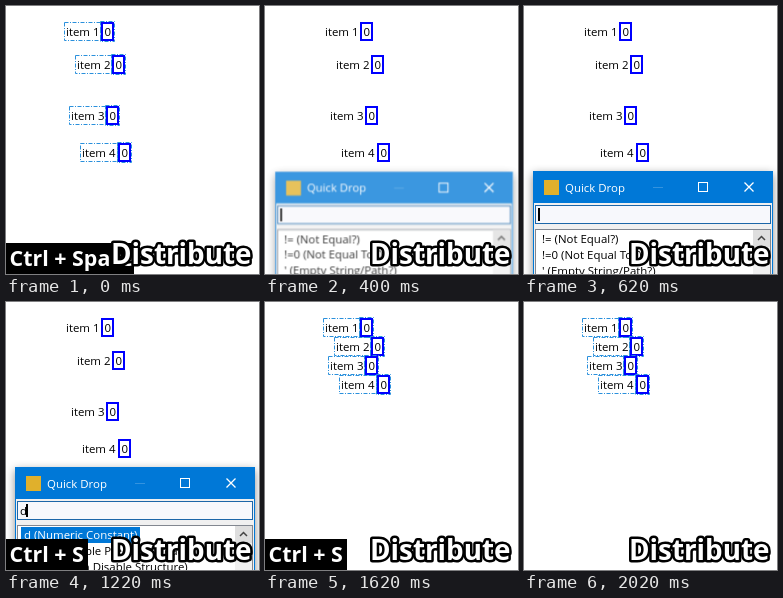
An HTML page that plays this animation: 253x268 px, repeating every 2220 ms.

```html
<!DOCTYPE html>
<html lang="en">
<head>
<meta charset="utf-8">
<title>Distribute</title>
<style>
  html, body { margin: 0; width: 100%; height: 100%; overflow: hidden; background: #fff; }
  svg { display: block; width: 253px; height: 268px; font: 11.45px "Open Sans", "Noto Sans", sans-serif; }
  text { white-space: pre; }

  .row, .ants, .window, .empty, .typed, .space, .save {
    animation: 2220ms step-end infinite;
  }
  .row { animation-name: compress; }
  .num { fill: #fff; stroke: #00f; stroke-width: 2; }
  .ants {
    fill: none; stroke: #2a90dc; stroke-dasharray: 4 1.5 1 1.5;
    animation-name: march;
  }
  .window {
    transform-origin: 129px 240px;
    filter: drop-shadow(0 3px 5px rgba(0, 0, 0, .45));
    animation-name: open;
  }
  .empty { animation-name: empty; }
  .typed { animation-name: typed; }
  .space { animation-name: space; }
  .save { animation-name: save; }
  .keys text { font-size: 21.4px; font-weight: 700; fill: #fff; }
  .caption {
    font-size: 27.8px; font-weight: 700; fill: #fff;
    stroke: #000; stroke-width: 5; stroke-linejoin: round; paint-order: stroke;
  }

  @keyframes compress {
    0% { transform: translateY(0); }
    72.973%, 100% { transform: translateY(var(--shift)); }
  }
  @keyframes march {
    0% { visibility: visible; stroke-dashoffset: 0; }
    9.009% { visibility: visible; stroke-dashoffset: -4; }
    18.018% { visibility: hidden; }
    72.973% { visibility: visible; stroke-dashoffset: 0; }
    81.982% { visibility: visible; stroke-dashoffset: -4; }
    90.991%, 100% { visibility: visible; stroke-dashoffset: 0; }
  }
  @keyframes open {
    0% { opacity: 0; transform: scale(.99); }
    18.018% { opacity: .77; transform: scale(.99); }
    27.928% { opacity: 1; transform: none; }
    72.973%, 100% { opacity: 0; transform: none; }
  }
  @keyframes empty {
    0% { opacity: 1; }
    36.937%, 100% { opacity: 0; }
  }
  @keyframes typed {
    0% { opacity: 0; }
    36.937%, 100% { opacity: 1; }
  }
  @keyframes space {
    0% { opacity: 1; }
    18.018%, 100% { opacity: 0; }
  }
  @keyframes save {
    0% { opacity: 0; }
    54.955% { opacity: 1; }
    90.991%, 100% { opacity: 0; }
  }
</style>
</head>
<body>
<svg viewBox="0 0 253 268">
  <g id="rows"></g>

  <g class="window">
    <rect x="9" y="165" width="240" height="120" fill="#0078d7"/>
    <rect x="10" y="197" width="238" height="88" fill="#f0f0f0"/>
    <rect x="20" y="174" width="15" height="15" fill="#e0b02c"/>
    <text x="41" y="185.5" fill="#fff">Quick Drop</text>
    <g fill="none" stroke="#fff">
      <path d="M129 181.5h10" opacity=".2"/>
      <rect x="174.5" y="176.5" width="9" height="9"/>
      <path d="M220.5 176.5l9 9m0-9l-9 9" stroke-width="1.3"/>
    </g>

    <rect x="11.5" y="199.5" width="235" height="18" fill="#f7f8fc" stroke="#1c66a8"/>
    <rect x="11.5" y="223.5" width="235" height="60" fill="#fff" stroke="#828790"/>
    <rect x="229" y="224" width="17" height="60" fill="#f0f0f0"/>
    <rect x="229" y="224" width="17" height="17" fill="#dedede"/>
    <path d="M234 234l3.5-3.5 3.5 3.5" fill="none" stroke="#444" stroke-width="1.5"/>

    <g class="empty">
      <rect x="14" y="202" width="2" height="13"/>
      <text x="18" y="237">!= (Not Equal?)</text>
      <text x="18" y="253">!=0 (Not Equal To 0?)</text>
      <text x="18" y="269">' (Empty String/Path?)</text>
    </g>
    <g class="typed">
      <text x="14" y="213">d</text>
      <rect x="20" y="202" width="2" height="13"/>
      <rect x="15" y="225" width="119" height="16" fill="#0078d7"/>
      <text x="18" y="237" fill="#fff">d (Numeric Constant)</text>
      <text x="18" y="253">dbl (To Double Precision Float)</text>
      <text x="18" y="269">dd (Diagram Disable Structure)</text>
    </g>
  </g>

  <g class="keys">
    <g class="space">
      <rect y="237" width="128" height="31"/>
      <text x="3.6" y="259.5">Ctrl + Space</text>
    </g>
    <g class="save">
      <rect y="237" width="82" height="31"/>
      <text x="3.6" y="259.5">Ctrl + S</text>
    </g>
  </g>
  <text class="caption" x="105" y="258">Distribute</text>
</svg>
<script>
  // Label x, control x and starting top of each item
  const items = [[60, 95, 16], [71, 106, 49], [65, 100, 100], [76, 112, 137]];
  const pitch = 19;

  document.getElementById('rows').innerHTML = items.map(([x, nx, top], i) => `
    <g class="row" style="--shift:${items[0][2] + i * pitch - top}px">
      <text x="${x}" y="${top + 14}">item ${i + 1}</text>
      <rect class="num" x="${nx + 1}" y="${top + 1}" width="11" height="17"/>
      <text x="${nx + 3.4}" y="${top + 14}">0</text>
      <rect class="ants" x="${x - 1.5}" y="${top + .5}" width="${nx - x + 1}" height="18"/>
      <rect class="ants" x="${nx - .5}" y="${top - .5}" width="14" height="20"/>
    </g>`).join('');
</script>
</body>
</html>
```
